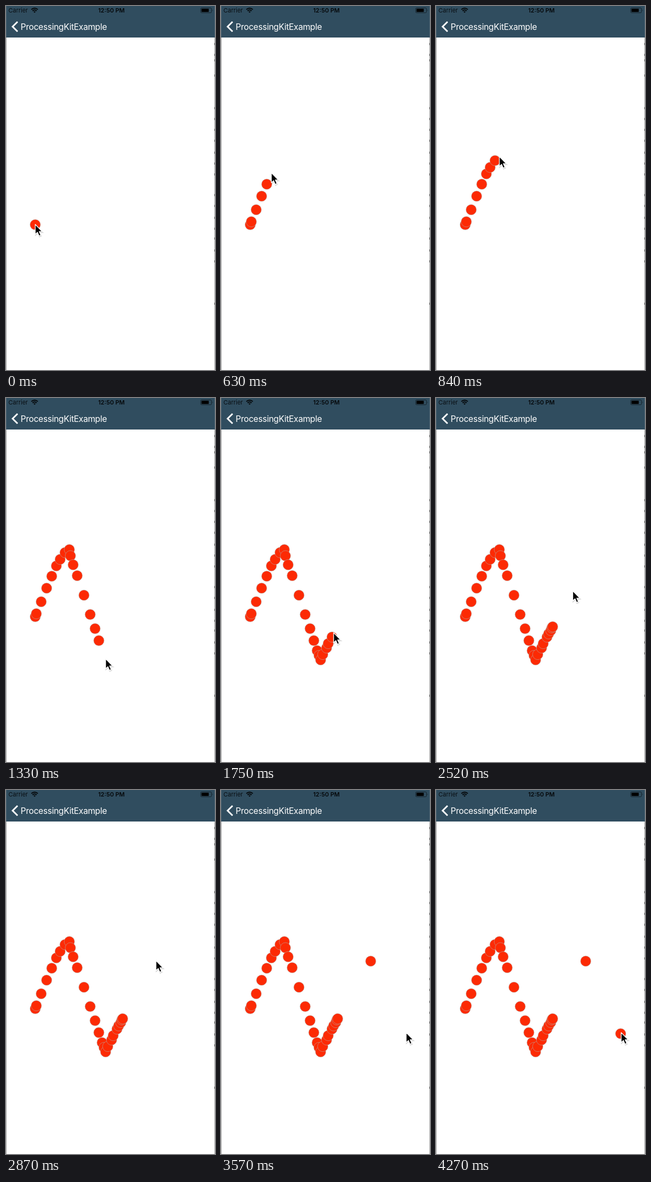
Animation, 386 px wide and 670 px high, one loop 4.34 s. Source, as an HTML page:

```html
<!DOCTYPE html>
<html lang="en">
<head>
<meta charset="utf-8">
<title>Drawing with touch</title>
<style>
  html, body { margin: 0; width: 100%; height: 100%; overflow: hidden; background: #fff; }
  svg { display: block; width: 100%; height: 100%; }
  text { font-family: Inter, Roboto, sans-serif; }
</style>
</head>
<body>
<svg viewBox="0 0 386 670">
  <rect width="386" height="670" fill="#fff"/>
  <g id="dots" fill="#fc2a04" stroke="#b9a8a2" stroke-width=".6"></g>

  <!-- window edges -->
  <path d="M.5 58V670M385.5 58V670" stroke="#a3a3a3"/>
  <path id="marks" stroke="#333" fill="none"/>

  <!-- status and navigation bars -->
  <rect width="386" height="58" fill="#304d5f"/>
  <path d="M.5 0V58M385.5 0V58" stroke="#4f6675"/>
  <text x="4.5" y="12" font-size="11" fill="#0a0f13">Carrier</text>
  <g fill="none" stroke="#05080a" stroke-width="1.9">
    <path d="M46.8 6.4Q52.8 1.4 58.8 6.4M49 9Q52.8 5.7 56.6 9"/>
    <path d="M52.8 12.6L50.7 10.4Q52.8 8.9 54.9 10.4Z" fill="#05080a" stroke="none"/>
  </g>
  <text x="194.7" y="12" font-size="11" font-weight="600" text-anchor="middle" fill="#05080a">12:50 PM</text>
  <rect x="359.5" y="3.5" width="20" height="9" rx="2" fill="none" stroke="#14212a"/>
  <rect x="361" y="5" width="13.5" height="6" rx=".8" fill="#000"/>
  <path d="M381 6.2q1.6 1.8 0 3.6z" fill="#14212a"/>
  <path d="M21.3 29L12.2 38L21.3 47" fill="none" stroke="#fff" stroke-width="3"/>
  <text x="27" y="43.7" font-size="15.7" letter-spacing="-.3" fill="#fff">ProcessingKitExample</text>

  <g id="cursor">
    <path d="M0 0V18.2L4.2 14.4L7.1 21.2L10.3 19.8L7.4 13.2H13Z" transform="translate(.6 1.6)"
      fill="#000" opacity=".14" stroke="#000" stroke-width="2"/>
    <path d="M0 0V18.2L4.2 14.4L7.1 21.2L10.3 19.8L7.4 13.2H13Z"
      fill="#000" stroke="#fff" stroke-width="1.3" stroke-linejoin="round"/>
  </g>
</svg>
<script>
const STEP = 70, LOOP = 4340;

// x, y, step at which the dot is drawn
const touches = [
  [54, 402.5, 0], [56, 397, 6], [65, 375, 7], [75, 350, 8], [84.5, 328, 9],
  [93, 309, 10], [100, 297, 11], [109, 284.5, 12], [117, 279, 13], [119, 290.5, 14],
  [124, 307, 15], [131.5, 327, 16], [144, 363, 17], [155.5, 398.5, 18], [164.5, 424.5, 19],
  [171.5, 446.5, 19], [177.5, 465, 20], [181, 474, 20], [184, 482, 20], [188, 472, 22],
  [195, 460, 23], [198, 452, 24], [205, 440, 25], [208, 434, 26], [212, 428, 27],
  [214, 423, 28], [215.5, 421, 29], [276.5, 315, 43], [341, 448.5, 61]
];
const drag = touches.slice(0, -2);

// free cursor moves between touches: start step, end step, from, to
const moves = [
  [32, 39, [215, 418.5], [277, 314]],
  [45, 50, [277, 314], [342, 446.5]]
];

const dotLayer = document.getElementById("dots");
const cursor = document.getElementById("cursor");

const dots = touches.map(([x, y]) => {
  const dot = document.createElementNS("http://www.w3.org/2000/svg", "circle");
  dot.setAttribute("cx", x);
  dot.setAttribute("cy", y);
  dot.setAttribute("r", 9.6);
  return dotLayer.appendChild(dot);
});

const markRows = [70, 90, 100, 128, 188, 208, 228, 248, 270, 290, 310, 348, 368, 390, 410, 428, 450, 470, 548];
document.getElementById("marks").setAttribute("d", markRows.map(y => `M385.5 ${y - 2}v4`).join(""));

const ease = u => u * u * (3 - 2 * u);

function cursorAt(step) {
  if (step < 5) return [54, 402];
  if (step < 30) {
    // the pointer runs one step ahead of the ink
    const [x, y] = drag.filter(t => t[2] <= step + 1).pop();
    return [x, y - 2];
  }
  const [start, end, from, to] = step < moves[1][0] ? moves[0] : moves[1];
  const u = ease(Math.min(1, Math.max(0, (step - start) / (end - start))));
  return from.map((v, i) => v + (to[i] - v) * u);
}

function render(ms) {
  const step = Math.floor((ms % LOOP) / STEP);
  dots.forEach((dot, i) => dot.setAttribute("visibility", touches[i][2] <= step ? "visible" : "hidden"));
  cursor.setAttribute("transform", `translate(${cursorAt(step)})`);
}

const origin = performance.now();
function tick() {
  render(performance.now() - origin);
  requestAnimationFrame(tick);
}
tick();
</script>
</body>
</html>
```
